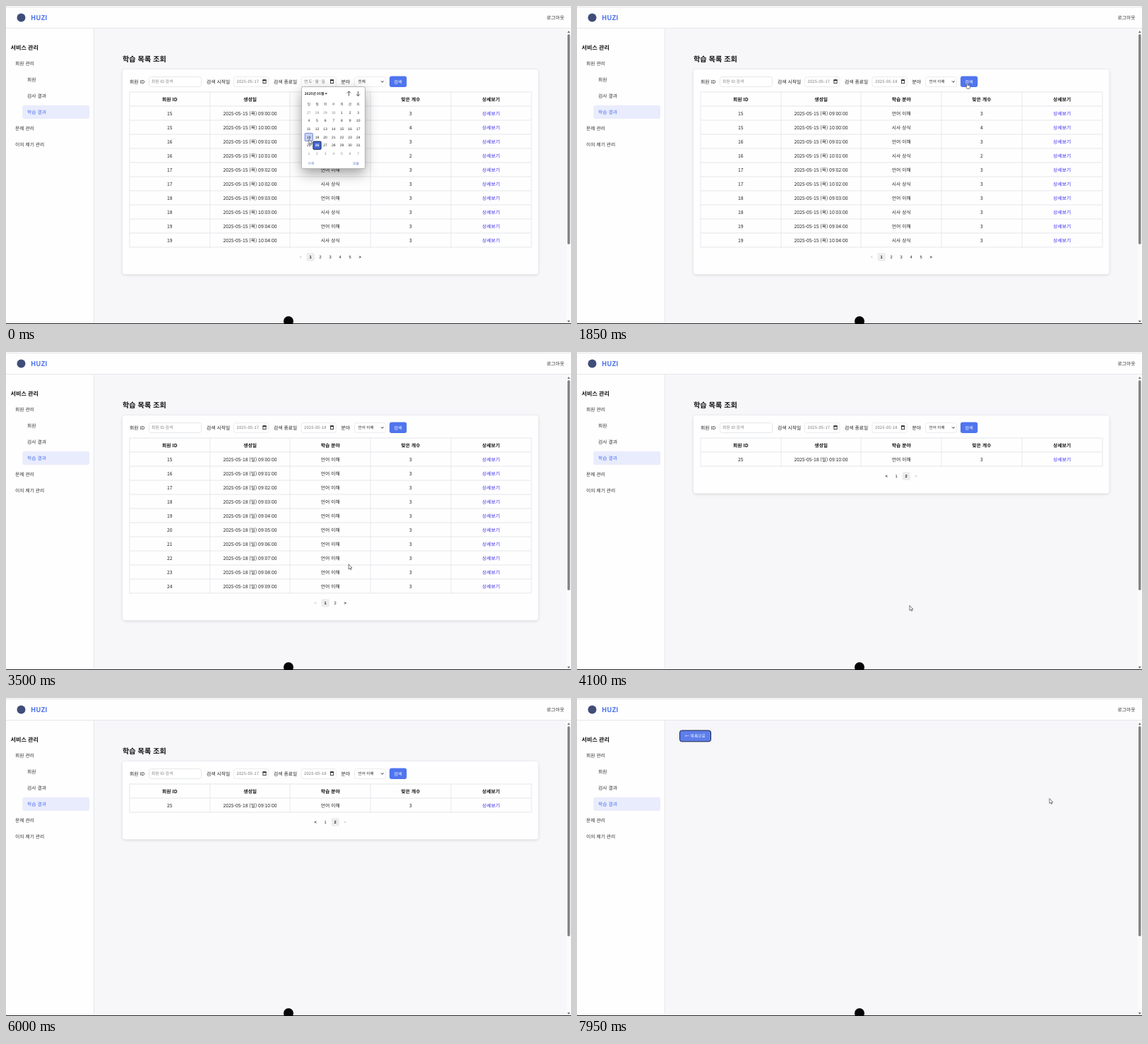
These frames come from a looping animation (800x451 px, 8000 ms). An HTML page with a canvas:

```html
<!DOCTYPE html>
<html lang="ko">
<head>
<meta charset="utf-8">
<style>
  html, body { margin: 0; width: 100%; height: 100%; overflow: hidden; background: #fff; }
  canvas { display: block; width: 800px; height: 451px; }
</style>
</head>
<body>
<canvas id="stage"></canvas>
<script>
const LOOP = 8000, W = 800, H = 451;
const CJK = '"Noto Sans CJK KR", "Noto Sans CJK", "Noto Sans", sans-serif';
const ARIAL = '"Liberation Sans", "Noto Sans CJK KR", sans-serif';
const BLUE = '#4f74ee', LINE = '#e6e7eb', INK = '#222';

// Moments at which the interface switches state
const AT = { dateChosen: 250, listOpen: 800, listHover: 1100, listChosen: 1350,
             results: 2100, pageTwo: 3950, detail: 7600 };

const canvas = document.getElementById('stage');
const ctx = canvas.getContext('2d');
const dpr = window.devicePixelRatio || 1;
canvas.width = W * dpr;
canvas.height = H * dpr;
ctx.scale(dpr, dpr);

function text(str, x, y, { size = 6.8, color = INK, bold = false, align = 'left', font = CJK, spacing = 0 } = {}) {
  ctx.font = `${bold ? 700 : 400} ${size}px ${font}`;
  ctx.textRendering = 'geometricPrecision';
  ctx.letterSpacing = spacing + 'px';
  ctx.textAlign = align;
  ctx.fillStyle = color;
  ctx.fillText(str, x, y + size * 0.36);
}

function rect(x, y, w, h, fill) {
  ctx.fillStyle = fill;
  ctx.fillRect(x, y, w, h);
}

function box(x, y, w, h, r, fill, stroke, shadow) {
  ctx.save();
  ctx.beginPath();
  ctx.roundRect(x, y, w, h, r);
  if (shadow) {
    ctx.shadowColor = shadow.color;
    ctx.shadowBlur = shadow.blur * dpr;
    ctx.shadowOffsetY = shadow.dy * dpr;
  }
  ctx.fillStyle = fill;
  ctx.fill();
  ctx.restore();
  if (stroke) {
    ctx.lineWidth = 1;
    ctx.strokeStyle = stroke;
    ctx.stroke();
  }
}

function shape(points, fill) {
  ctx.beginPath();
  points.forEach(([x, y]) => ctx.lineTo(x, y));
  ctx.closePath();
  ctx.fillStyle = fill;
  ctx.fill();
}

function line(points, color, width) {
  ctx.beginPath();
  points.forEach(([x, y]) => ctx.lineTo(x, y));
  ctx.lineWidth = width;
  ctx.strokeStyle = color;
  ctx.stroke();
}

function circle(x, y, r, fill) {
  ctx.beginPath();
  ctx.arc(x, y, r, 0, Math.PI * 2);
  ctx.fillStyle = fill;
  ctx.fill();
}

function drawFrame() {
  rect(0, 0, W, H, '#f7f7fa');
  rect(0, 0, W, 31, '#fefefe');
  rect(0, 1, W, 1, '#e4e4e9');
  rect(0, 32, 124, H, '#fefefe');
  rect(124, 32, 1, H, LINE);
  rect(0, 31, W, 1, LINE);

  circle(21.5, 16.5, 6, '#3f4d78');
  text('HUZI', 35, 16.7, { size: 9.6, bold: true, color: BLUE });
  text('로그아웃', 790.5, 16.7, { align: 'right', color: '#333' });

  text('서비스 관리', 6.5, 59.3, { size: 8.1, bold: true, color: '#111' });
  box(23.3, 140.8, 94.7, 19.2, 3, '#e9ecfc');
  ['회원 관리', '회원', '검사 결과', '학습 결과', '문제 관리', '이의 제기 관리'].forEach((label, i) => {
    const nested = i > 0 && i < 4;
    text(label, nested ? 30 : 13, 81.5 + 23 * i, { color: i === 3 ? BLUE : '#333' });
  });
}

function drawEdges() {
  rect(794, 32, 6, H, '#fbfbfb');
  box(795, 40, 3.6, 298, 1.8, '#858585');
  shape([[794.8, 38], [798.8, 38], [796.8, 35]], '#777');
  shape([[794.8, 446], [798.8, 446], [796.8, 449]], '#777');
  rect(0, 450, W, 1, '#26242a');
  circle(400, 447, 7, '#050505');
}

function dateField(x, value, spacing) {
  box(x + 0.5, 100.5, 49.5, 14, 3, '#fff', '#ececf0');
  text(value, x + 4.5, 107.2, { size: 5.8, color: '#777', spacing });
  const ix = x + 41.5;
  ctx.lineWidth = 0.8;
  ctx.strokeStyle = '#222';
  ctx.strokeRect(ix + 0.4, 104.9, 4.2, 4.7);
  rect(ix, 104.4, 5, 1.7, '#222');
}

function drawFilters(t) {
  text('회원 ID', 175, 107.3);
  box(202.5, 100.5, 74, 14, 3, '#fff', LINE);
  text('회원 ID 검색', 206, 107.2, { size: 5.8, color: '#858585' });
  text('검색 시작일', 284, 107.3);
  dateField(322, '2025-05-17', 0.2);
  text('검색 종료일', 379, 107.3);
  if (t < AT.dateChosen) dateField(417.5, '연도-월-일', 0.9);
  else dateField(417.5, '2025-05-18', 0.2);
  text('분야', 474.5, 107.3);
  box(493.5, 100.5, 44, 14, 3, '#fff', '#ececf0');
  text(t < AT.listChosen ? '전체' : '언어 이해', 498.5, 107.2, { size: 5.6 });
  line([[531, 106.4], [532.8, 108.2], [534.6, 106.4]], '#222', 1);
  box(543, 99.5, 24.3, 15.5, 3, BLUE);
  text('검색', 555.1, 107.3, { size: 6.3, color: '#fff', align: 'center' });
}

function tableRows(t) {
  const pad = n => String(n).padStart(2, '0');
  if (t < AT.results) {
    return Array.from({ length: 10 }, (_, i) => [
      15 + (i >> 1),
      `2025-05-15 (목) ${pad(9 + i % 2)}:${pad(i >> 1)}:00`,
      i % 2 ? '시사 상식' : '언어 이해',
      i === 1 ? 4 : i === 3 ? 2 : 3]);
  }
  const first = t < AT.pageTwo ? 0 : 10;
  return Array.from({ length: first ? 1 : 10 }, (_, i) => [
    15 + first + i, `2025-05-18 (일) 09:${pad(first + i)}:00`, '언어 이해', 3]);
}

function drawPager(y, pages, current) {
  const labels = ['<', ...Array.from({ length: pages }, (_, i) => i + 1), '>'];
  labels.forEach((label, i) => {
    const x = 459.2 + (i - (pages + 1) / 2) * 14;
    const active = i === current;
    const arrow = i === 0 || i > pages;
    const disabled = (i === 0 && current === 1) || (i > pages && current === pages);
    if (active) box(x - 5.7, y - 5.8, 11.4, 11.6, 2, '#ededee');
    text(String(label), x, y, { size: 5.8, font: ARIAL, align: 'center',
      bold: active || (arrow && !disabled), color: disabled ? '#aaa' : INK });
  });
}

function drawList(t) {
  const rows = tableRows(t);
  const bottom = 142 + rows.length * 20;
  const left = 175, colWidth = 113.7;
  text('학습 목록 조회', 165, 75, { size: 10.2, bold: true, color: '#111' });
  box(165, 90, 588.5, bottom - 51.5, 4, '#fefefe', null, { color: 'rgba(0,0,0,.14)', blur: 4, dy: 1 });
  drawFilters(t);

  for (let y = 122; y <= bottom; y += 20) rect(left, y - 0.5, colWidth * 5, 1, LINE);
  for (let c = 0; c <= 5; c++) rect(Math.round(left + c * colWidth) - 0.5, 121.5, 1, bottom - 121, LINE);

  const cell = (value, col, y, style) =>
    text(String(value), left + (col + 0.5) * colWidth, y, { align: 'center', ...style });
  ['회원 ID', '생성일', '학습 분야', '맞은 개수', '상세보기'].forEach((h, c) =>
    cell(h, c, 132.2, { bold: true, color: '#111' }));
  rows.forEach((row, r) => {
    const y = 152.2 + r * 20;
    row.forEach((value, c) => cell(value, c, y));
    cell('상세보기', 4, y, { color: '#3a2cf0' });
  });
  drawPager(bottom + 14, t < AT.results ? 5 : 2, t < AT.pageTwo ? 1 : 2);
}

const POPUP_SHADOW = { color: 'rgba(0,0,0,.38)', blur: 18, dy: 7 };

function drawCalendar() {
  const step = 11.66;
  box(418.5, 114.5, 90, 116, 2, '#fff', '#b5b5b8', POPUP_SHADOW);
  text('2025년 05월', 422.7, 124.5, { size: 4.9, bold: true });
  shape([[451.5, 123.5], [455, 123.5], [453.2, 125.6]], INK);
  for (const [x, dir] of [[485.5, -1], [498.5, 1]]) {
    line([[x, 124.3 - dir * 3.3], [x, 124.3 + dir * 3.3]], '#333', 0.8);
    line([[x - 2.7, 124.3 + dir * 0.7], [x, 124.3 + dir * 3.4], [x + 2.7, 124.3 + dir * 0.7]], '#333', 0.8);
  }
  const label = (str, col, y, style) =>
    text(str, 428.8 + col * step, y, { size: 5, font: ARIAL, align: 'center', ...style });
  [...'일월화수목금토'].forEach((d, c) => label(d, c, 139, { color: '#555' }));

  box(423.2, 180.4, 11.2, 11.2, 1, '#c8d3f6', '#7187cf');
  box(434.9, 192.1, 11.2, 11.2, 1, '#4268d5', '#182750');
  for (let i = 0; i < 42; i++) {
    const day = i - 3;
    const shown = day < 1 ? day + 30 : day > 31 ? day - 31 : day;
    const outside = shown !== day;
    label(String(shown), i % 7, 151 + Math.floor(i / 7) * step,
      { color: outside ? '#8a8a8a' : day === 26 ? '#fff' : INK, bold: day === 26 });
  }
  text('삭제', 427.3, 223.3, { size: 4.9, color: '#6f83c6' });
  text('오늘', 491, 223.3, { size: 4.9, color: '#4a66c0' });
}

function drawOptions(t) {
  const hovered = t < AT.listHover ? 0 : 1;
  box(493.5, 114.5, 42, 79.5, 2, '#fff', '#aaaab0', POPUP_SHADOW);
  ['전체', '언어 이해', '시사 상식', '지각 추론', '처리 속도', '작업 기억', '공간 지각력'].forEach((label, i) => {
    const y = 120.6 + i * 11.4;
    if (i === hovered) rect(494, y - 5.6, 41, 11.3, '#3f62c4');
    text(label, 498.5, y, { size: 5.6, color: i === hovered ? '#fff' : INK });
  });
}

function drawDetail() {
  box(145.5, 46, 44, 15.8, 3, '#5d7eea', '#1b2240');
  text('← 목록으로', 167.5, 54, { size: 5.8, color: '#fff', align: 'center' });
}

// Pointer stops: time, x, y
const PATH = [
  [0, 429, 189], [250, 429, 189], [750, 530, 119], [1000, 530, 119], [1150, 521, 135],
  [1350, 521, 135], [1750, 552.5, 109], [1900, 552.5, 109], [2400, 550.5, 115.5], [3050, 550.5, 115.5],
  [3700, 466, 355], [3900, 466, 355], [4100, 471, 359.5], [4350, 471, 359.5],
  [4750, 555, 255], [5450, 674, 149], [7300, 674, 149], [7600, 669, 142.5], [LOOP, 669, 142.5]
];
const within = (t, spans) => spans.some(([a, b]) => t >= a && t < b);

function pointerAt(t) {
  const i = Math.max(1, PATH.findIndex(p => p[0] > t));
  const [t0, x0, y0] = PATH[i - 1], [t1, x1, y1] = PATH[i];
  const u = (t - t0) / (t1 - t0), e = u * u * (3 - 2 * u);
  return [x0 + (x1 - x0) * e, y0 + (y1 - y0) * e];
}

const ARROW = new Path2D('M0 0V7.2L1.7 5.7L2.8 8L3.8 7.5L2.8 5.3H4.9Z');
const HAND = new Path2D('M-.6 .6Q0-.4 .7 .6V3.2L3.6 3.9Q4.4 4.2 4.2 5.2L3.5 8.2H-.2L-2.5 5.2Q-2.4 4.2-1.5 4.7L-.6 5.4Z');

function drawPointer(t) {
  if (within(t, [[5500, 6500]])) return;
  const hand = within(t, [[1650, 3100], [3650, 4000], [5350, 7450]]);
  const shapePath = hand ? HAND : ARROW;
  ctx.save();
  ctx.translate(...pointerAt(t));
  ctx.lineWidth = 0.8;
  ctx.strokeStyle = '#555';
  ctx.fillStyle = '#fff';
  ctx.fill(shapePath);
  ctx.stroke(shapePath);
  ctx.restore();
}

function render(now) {
  const t = now % LOOP;
  drawFrame();
  if (t < AT.detail) drawList(t);
  else drawDetail();
  drawEdges();
  if (t < AT.dateChosen) drawCalendar();
  if (t >= AT.listOpen && t < AT.listChosen) drawOptions(t);
  drawPointer(t);
}

let start;
function tick(now) {
  start ??= now;
  render(Math.max(0, now - start));
  requestAnimationFrame(tick);
}
requestAnimationFrame(tick);
</script>
</body>
</html>
```
